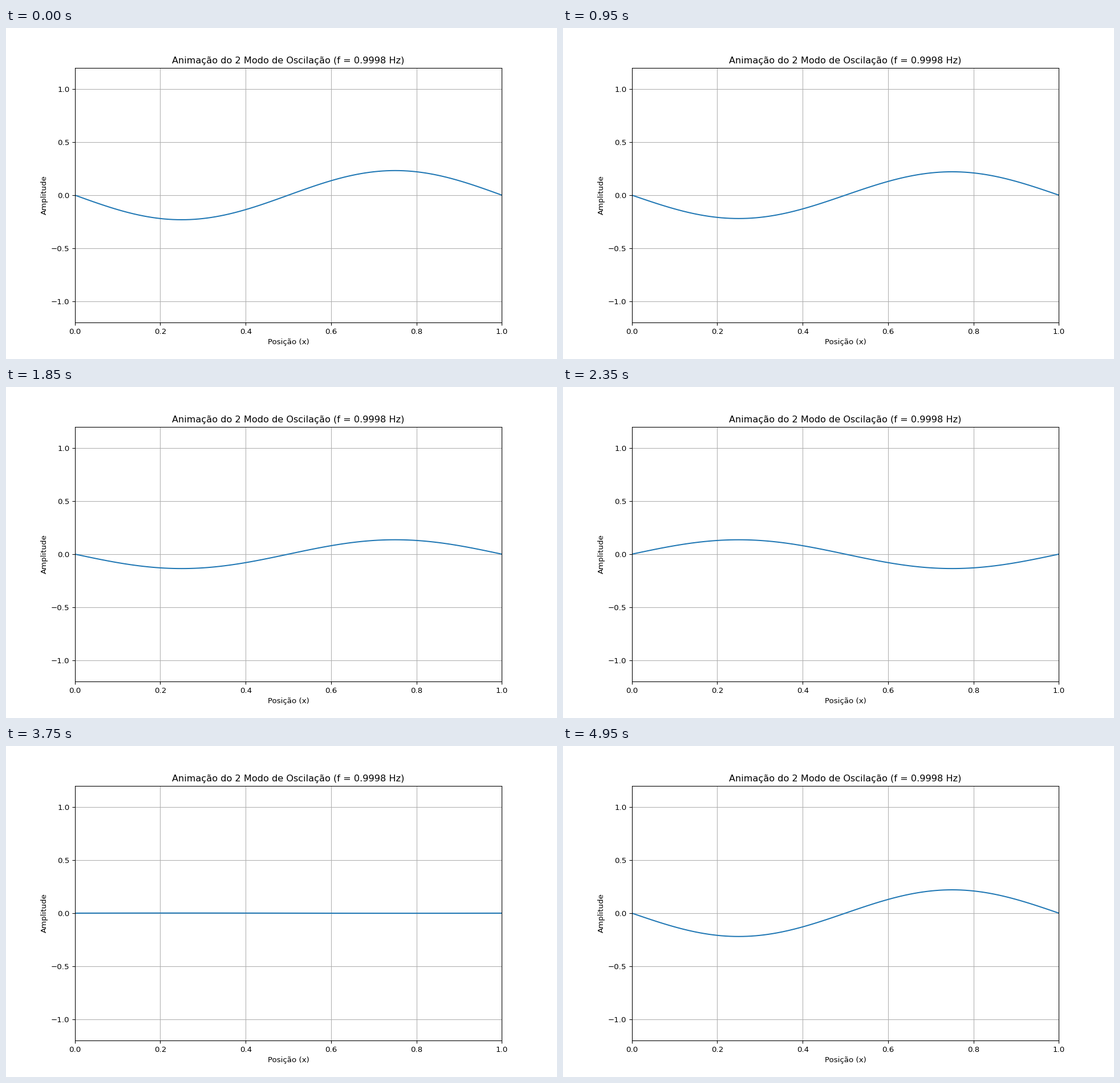
These frames come from a looping animation (966x580 px, 5 s). A matplotlib script:

```python
import numpy as np
import matplotlib.pyplot as plt
from matplotlib.animation import FuncAnimation

WIDTH, HEIGHT, DPI = 966, 580, 96.6
FRAMES, INTERVAL = 100, 50      # 5 s loop
MODE, FREQ = 2, 0.9998
PEAK = -0.2315

plt.rcParams["font.family"] = "DejaVu Sans"

# The tiny margin keeps the pixel size from being truncated.
fig, ax = plt.subplots(
    figsize=((WIDTH + 1e-6) / DPI, (HEIGHT + 1e-6) / DPI), dpi=DPI)

x = np.linspace(0, 1, 101)
shape = PEAK * np.sin(MODE * np.pi * x)

line, = ax.plot(x, shape)
ax.set_xlim(0, 1)
ax.set_ylim(-1.2, 1.2)
ax.set_xlabel("Posição (x)")
ax.set_ylabel("Amplitude")
ax.set_title(f"Animação do {MODE} Modo de Oscilação (f = {FREQ:.4f} Hz)")
ax.grid(True)


def update(frame):
    t = frame * INTERVAL / 1000
    line.set_ydata(shape * np.cos(2 * np.pi * FREQ * t))
    return line,


anim = FuncAnimation(fig, update, frames=FRAMES, interval=INTERVAL,
                     repeat=True, repeat_delay=0)
plt.show()
```
